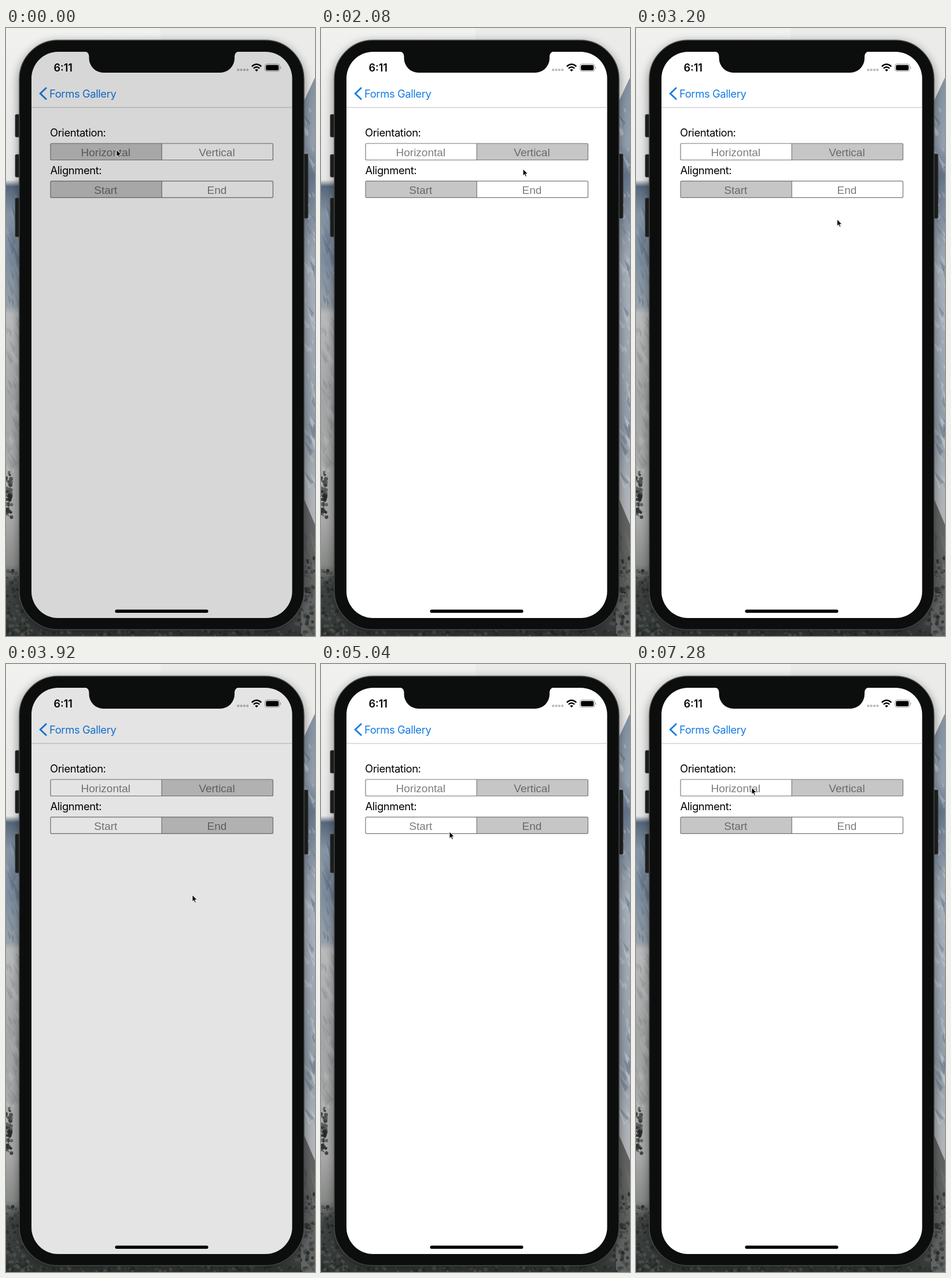
Recreate the animation shown at these times as an HTML page. Size 534x1048 px, loop 7.36 s.

```html
<!DOCTYPE html>
<html lang="en">
<head>
<meta charset="utf-8">
<title>Flyout</title>
<style>
html, body { margin: 0; width: 100%; height: 100%; overflow: hidden; background: #ddd; }
svg { display: block; width: 534px; height: 1048px; }
.ui { font: 18.4px Inter, sans-serif; letter-spacing: -.4px; }
.seg { font: 19px "Liberation Sans", Arial, sans-serif; text-anchor: middle; }
.time { font: 600 18px Inter, sans-serif; }
#panel { filter: drop-shadow(0 1px 2px rgba(0,0,0,.5)); }
</style>
</head>
<body>
<svg viewBox="0 0 534 1048" xmlns="http://www.w3.org/2000/svg">
  <defs>
    <clipPath id="screen"><rect x="44" y="41" width="450.5" height="976" rx="46"/></clipPath>
    <filter id="blur" x="-10%" y="-10%" width="120%" height="120%"><feGaussianBlur stdDeviation="8"/></filter>
  </defs>

  <g id="scene"></g>
  <rect x="21" y="24" width="496" height="1016" rx="70" fill="#000" opacity=".4" filter="url(#blur)"/>

  <g fill="#1b1c1c" stroke="#3b3d3d" stroke-width=".8">
    <rect x="16" y="149" width="10" height="39" rx="2"/>
    <rect x="16" y="218" width="10" height="39" rx="2"/>
    <rect x="16" y="293" width="10" height="67" rx="2"/>
    <rect x="512" y="217" width="10" height="111" rx="2"/>
  </g>
  <rect x="23" y="21" width="492" height="1016" rx="67" fill="#0c0d0d" stroke="#484a49" stroke-width="1.4"/>

  <g clip-path="url(#screen)">
    <rect x="44" y="41" width="451" height="976" fill="#fff"/>
    <path d="M44 137H495" stroke="#bdbdbd"/>
    <path d="M70 102.8L59.2 113L70 123.2" fill="none" stroke="#167be6" stroke-width="2.8"/>
    <g class="ui">
      <text x="75" y="120" fill="#167be6">Forms Gallery</text>
      <text x="76" y="187">Orientation:</text>
      <text x="76.5" y="252">Alignment:</text>
    </g>
    <g id="segs" class="seg"></g>
    <rect id="dim" x="44" y="41" width="451" height="976" fill="#020604"/>
    <g id="panel">
      <rect id="sheet" fill="#fff"/>
      <text id="label" class="ui">Flyout Content</text>
    </g>
    <text class="time" x="82.5" y="74.5">6:11</text>
    <g id="dots" fill="#000" opacity=".27"></g>
    <g fill="none" stroke="#000" stroke-width="2.5">
      <path d="M424.8 66.3Q433 58.8 441.2 66.3"/>
      <path d="M427.8 69.6Q433 65 438.2 69.6"/>
    </g>
    <path d="M430.2 72.2Q433 69.8 435.8 72.2L433 75Z"/>
    <rect x="447.5" y="62" width="25.5" height="12.6" rx="3.6" fill="none" stroke="#000" stroke-opacity=".4"/>
    <rect x="449.2" y="63.7" width="22" height="9.2" rx="2.2"/>
    <path d="M474.4 66.2Q476.4 68.3 474.4 70.4Z" opacity=".45"/>
    <rect x="188.5" y="1002.4" width="161" height="5.6" rx="2.8"/>
  </g>
  <path d="M135.5 40.5H403A8 8 0 0 0 395 48.5V52A25 25 0 0 1 370 77H168.5A25 25 0 0 1 143.5 52V48.5A8 8 0 0 0 135.5 40.5Z" fill="#0c0d0d"/>

  <path id="cursor" d="M0 0V11.6L2.6 9.3L4.4 13.4L6.3 12.5L4.6 8.6H8.2Z" fill="#000" stroke="#fff" stroke-width=".9"/>
</svg>
<script>
const LOOP = 7360, STEP = 80, MOVE = 400;
const $ = id => document.getElementById(id);

function add(parent, tag, attrs, text) {
  const el = document.createElementNS('http://www.w3.org/2000/svg', tag);
  set(el, attrs);
  if (text) el.textContent = text;
  parent.appendChild(el);
  return el;
}
function set(el, attrs) {
  for (const k in attrs) el.setAttribute(k, attrs[k]);
}

// Mountain backdrop
let seed = 7;
const rnd = () => (seed = (seed * 16807) % 2147483647) / 2147483647;
const pick = list => list[Math.floor(rnd() * list.length)];
const scene = $('scene');

function strip(id, x, w, stops) {
  const grad = add(scene, 'linearGradient', { id, x1: 0, x2: 0, y1: 0, y2: 1 });
  for (const [y, color] of stops) add(grad, 'stop', { offset: y / 1048, 'stop-color': color });
  add(scene, 'rect', { x, y: 0, width: w, height: 1048, fill: `url(#${id})` });
}
function shards(n, x, w, y0, y1, colors, alpha, lean) {
  for (let i = 0; i < n; i++) {
    const px = x + rnd() * w, py = y0 + rnd() * (y1 - y0);
    const a = 4 + rnd() * 12, h = a * lean;
    add(scene, 'path', {
      d: `M${px} ${py}l${a} ${h}l${-a * .4} ${4 + rnd() * 6}Z`,
      fill: pick(colors), opacity: alpha * (.4 + .6 * rnd())
    });
  }
}
function leaves(n, x, w, y0, y1) {
  for (let i = 0; i < n; i++)
    add(scene, 'circle', {
      cx: x + rnd() * w, cy: y0 + rnd() * (y1 - y0), r: 1 + rnd() * 2.5,
      fill: pick(['#262a28', '#3a3f3d', '#4d5250']), opacity: .8
    });
}

strip('left', 0, 267, [[0, '#f1f1ef'], [262, '#e6e7e6'], [273, '#56677b'], [320, '#8494a5'],
  [400, '#7d8ea0'], [480, '#98a2ab'], [492, '#b8babb'], [640, '#a3a5a6'], [770, '#a9aaaa'],
  [850, '#a8a9a8'], [925, '#888a88'], [960, '#414543'], [1048, '#303432']]);
strip('right', 267, 267, [[0, '#f1f1ef'], [82, '#ebebea'], [88, '#8492a2'], [200, '#95a1af'],
  [255, '#66758a'], [330, '#8794a3'], [420, '#a9b2bc'], [560, '#9fa9b4'], [700, '#929da9'],
  [790, '#b0b5ba'], [860, '#b4b6b8'], [1048, '#2e3230']]);
add(scene, 'path', { d: 'M267 0H534V85L512 132H267Z', fill: '#ebebea' });
add(scene, 'path', { d: 'M510 800L534 856V1048H510Z', fill: '#626464' });
shards(22, -6, 24, 275, 480, ['#4d5d70', '#a9b5c1', '#66778a'], .4, 2);
shards(40, -6, 24, 490, 770, ['#c9cacb', '#8a8d8f'], .5, 1.3);
shards(90, 510, 26, 135, 790, ['#e2e5e8', '#596a7f', '#ccd2d8'], .5, 1.2);
shards(25, 510, 26, 850, 960, ['#7d7f7f', '#444746'], .4, 2);
leaves(60, 0, 10, 765, 845);
leaves(150, 0, 40, 935, 1048);
leaves(120, 500, 34, 910, 1048);
leaves(120, 40, 460, 1038, 1048);

// Segmented buttons
const segs = $('segs');
function segment(y, names) {
  const cells = names.map((name, i) => {
    const x = 77 + i * 192.2;
    const box = add(segs, 'rect', { x, y, width: 192.2, height: 28.5 });
    const text = add(segs, 'text', { x: x + 95.3, y: y + 21.7 }, name);
    return { box, text };
  });
  add(segs, 'rect', { x: 77, y, width: 384.4, height: 28.5, rx: 2, fill: 'none', stroke: '#777', 'stroke-width': 1.2 });
  add(segs, 'path', { d: `M269.2 ${y}v28.5`, stroke: '#777', 'stroke-width': 1.2 });
  return on => cells.forEach((c, i) => {
    c.box.setAttribute('fill', i === on ? '#c6c6c6' : '#fff');
    c.text.setAttribute('fill', i === on ? '#696969' : '#7d7d7d');
  });
}
const orient = segment(199, ['Horizontal', 'Vertical']);
const align = segment(263.8, ['Start', 'End']);
for (let i = 0; i < 4; i++) add($('dots'), 'circle', { cx: 401.3 + i * 5.3, cy: 72.2, r: 2.1 });

// Flyout runs: opening time, closing time, side
const runs = [
  { open: -68, close: 1171, side: 'left' },
  { open: 2227, close: 2780, side: 'top' },
  { open: 3876, close: 4560, side: 'bottom' },
  { open: 5750, close: 6860, side: 'top' }
];
// Each side: box, label position, direction and travel
const sides = {
  left: { box: [44, 41, 144, 976], label: [53.5, 118], dir: [-1, 0], travel: 212 },
  top: { box: [44, 41, 451, 93], label: [53.5, 118], dir: [0, -1], travel: 178 },
  bottom: { box: [44, 935, 451, 82], label: [53.5, 964], dir: [0, 1], travel: 166 }
};
const ease = u => { u = Math.min(1, Math.max(0, u)); return 1 - (1 - u) ** 2; };

// Pointer path: time, x, y
const path = [
  [0, 191, 210], [320, 194, 214], [900, 250, 316], [1160, 266, 312], [1280, 274, 294],
  [1800, 350, 214], [1960, 351, 212], [2480, 337, 441], [2840, 337, 441], [3400, 352, 284],
  [3640, 351, 281], [3920, 322, 398], [4240, 318, 424], [4560, 318, 424], [5040, 222, 289],
  [5200, 214, 277], [5280, 213, 276], [5440, 213, 276], [6000, 219, 298], [6400, 222, 326],
  [6860, 221, 318], [7280, 200, 213], [7360, 200, 213]
];
function pointer(t) {
  const i = Math.max(1, path.findIndex(p => p[0] >= t));
  const [t0, x0, y0] = path[i - 1], [t1, x1, y1] = path[i];
  let u = (t - t0) / (t1 - t0);
  u = u * u * (3 - 2 * u);
  return [x0 + (x1 - x0) * u, y0 + (y1 - y0) * u];
}

function draw(t) {
  orient(t >= 1960 ? 1 : 0);
  align(t >= 3640 && t < 5440 ? 1 : 0);

  const run = runs.filter(r => t >= r.open).pop();
  const shown = ease((t - run.open) / MOVE) - ease((t - run.close) / MOVE);
  const { box: [x, y, width, height], label, dir, travel } = sides[run.side];
  const off = travel * (1 - shown);
  set($('dim'), { opacity: shown / 2 });
  set($('sheet'), { x, y, width, height });
  set($('label'), { x: label[0], y: label[1] });
  set($('panel'), {
    transform: `translate(${dir[0] * off} ${dir[1] * off})`,
    visibility: shown > .33 ? 'visible' : 'hidden'
  });
  set($('cursor'), { transform: `translate(${pointer(t)})` });
}

const start = performance.now();
function tick() {
  const t = (performance.now() - start) % LOOP;
  draw(Math.floor(t / STEP) * STEP);
  requestAnimationFrame(tick);
}
tick();
</script>
</body>
</html>
```
